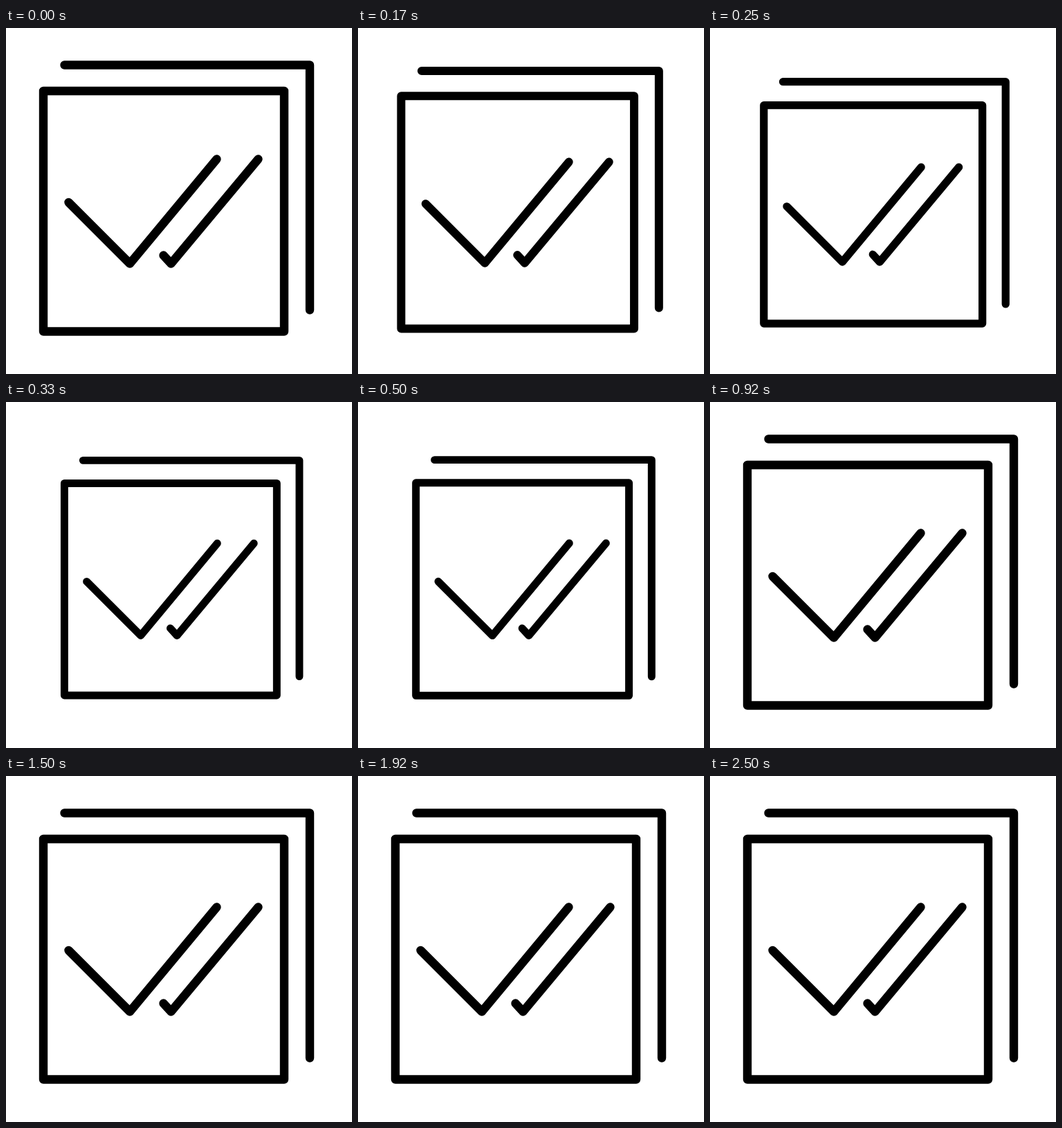
An HTML page for the animation above (2.58 s loop, 500x500 px).

```html
<!DOCTYPE html>
<html lang="en">
<head>
<meta charset="utf-8">
<title>Double check pulse</title>
<style>
  html, body { margin: 0; width: 100%; height: 100%; overflow: hidden; background: #fff; }
  svg { display: block; width: 100%; height: 100%; }
</style>
</head>
<body>
<svg viewBox="0 0 500 500">
  <g id="icon" fill="none" stroke="#000" stroke-width="12.4" stroke-linecap="round" stroke-linejoin="round">
    <path d="M84.5 53.5H439V407.5"/>
    <rect x="54" y="91" width="348" height="347.5"/>
    <path d="M90.5 252L179 340.5L304.5 189.5"/>
    <path d="M227.5 328.5L238.5 340.5L364.5 189.5"/>
  </g>
</svg>
<script>
  const LOOP = 2580, STEP = 1000 / 12;
  const LOW = 410, END = 800, DEPTH = 0.1212;
  const CX = 311.5, CY = 315;
  const icon = document.getElementById('icon');

  const ease = x => x < 0.5 ? 4 * x ** 3 : 1 - 4 * (1 - x) ** 3;

  function scaleAt(t) {
    if (t >= END) return 1;
    const x = t < LOW ? t / LOW : (END - t) / (END - LOW);
    return 1 - DEPTH * ease(x);
  }

  // The pulse moves in twelve poses per second.
  function draw(t) {
    const pose = Math.floor((t % LOOP + 4) / STEP) * STEP;
    const s = scaleAt(pose);
    icon.setAttribute('transform', `translate(${CX} ${CY}) scale(${s}) translate(${-CX} ${-CY})`);
  }

  const start = performance.now();
  function tick() {
    draw(performance.now() - start);
    requestAnimationFrame(tick);
  }
  tick();
</script>
</body>
</html>
```
